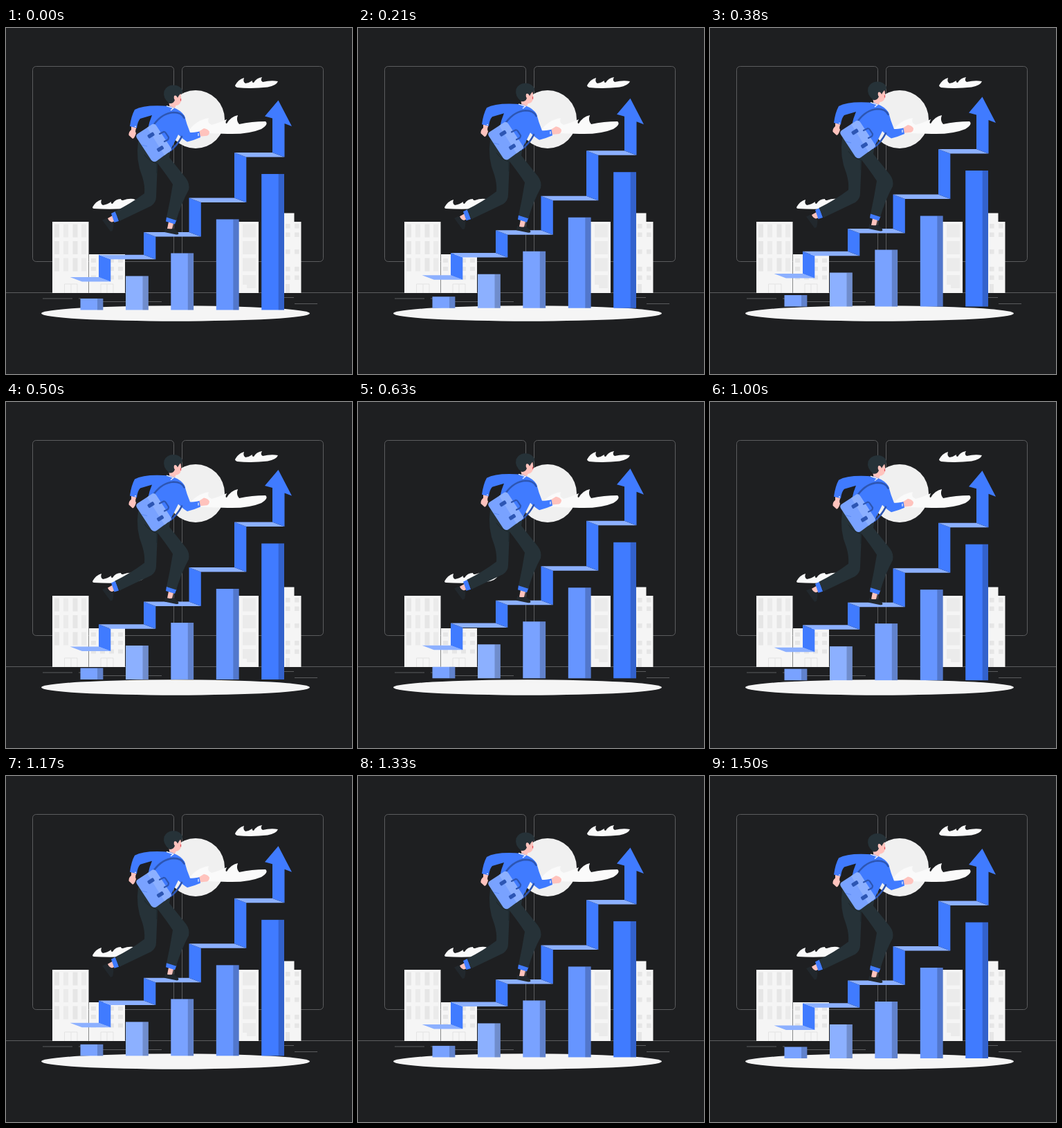
Write an HTML page that moves like this. It is 500x500 px and loops after 1540 ms.

```html
<!DOCTYPE html>
<html>
<head>
<meta charset="utf-8">
<style>
html, body { margin: 0; height: 100%; overflow: hidden; background: #1e1f21; }
svg { display: block; width: 100vw; height: 100vh; }
.line { fill: none; stroke: #5b5c5e; }
.wall { fill: #f5f5f5; }
.cloud { fill: #fafafa; }
.blue { fill: #407bff; }
.pale { fill: #8cb0ff; }
.dark { fill: #263238; }
.shoe { fill: #22282d; }
.skin { fill: #ffc3bd; }
.navy { fill: #2d56b3; }
.strap { fill: none; stroke: #2d56b3; stroke-width: 2.6; stroke-linecap: round; }
</style>
</head>
<body>
<svg viewBox="0 0 500 500">
  <g class="line">
    <rect x="38.5" y="55.5" width="204" height="282" rx="5"/>
    <rect x="254.5" y="55.5" width="204" height="282" rx="5"/>
    <path d="M0 382.5H500M53 391H96M105 391H108M140 395.5H225M400 389.5H416M417 398.5H450"/>
  </g>
  <g class="wall">
    <path d="M67 280H119.5V383H67ZM120 327H172V383H120ZM336 280H365V383H336ZM402 267.5H416.5V280H426.5V383H402Z"/>
  </g>
  <g id="windows"></g>
  <path d="M84.500 383V370H103V383M94 370V383M137 383V370H155V383M146 370V383" fill="none" stroke="#e3e3e3"/>
  <circle cx="274" cy="132" r="42" fill="#f0f0f0"/>
  <g class="cloud">
    <path d="M262 151Q274 133 293 130Q290 137 297 140Q308 137 319 132Q316 138 319 138Q325 128 335 126Q332 134 337 139Q355 135 375 135Q380 139 369 146Q350 154 320 153Q290 152 262 151Z"/>
    <path d="M331 83Q336 74 344 72Q342 78 346 80Q352 79 356 76Q355 79 358 79Q362 72 370 71Q367 76 371 78Q383 75 393 77Q391 83 378 85.500Q355 88 334 86Q331 85 331 83Z"/>
    <path d="M125 259Q130 250 138 248Q136 254 140 256Q147 255 152 251Q151 254 154 254Q158 247 166 247Q166 249 169 249Q177 246 184 247Q193 251 202 251Q200 258 185 260Q155 263 127 261Q125 261 125 259Z"/>
  </g>
  <ellipse cx="245" cy="412.500" rx="194" ry="11.200" class="wall"/>

  <g id="mover">
    <g id="bars"></g>
    <g id="stairs"></g>
    <path class="blue" d="M385 180V130.500L374 127.500L393.500 104.500L413 142L402.500 138V186.500Z"/>

    <g id="runner">
      <path class="skin" d="M147 275L154 271L157 279L150 282Z"/>
      <path class="shoe" d="M139 277.500L146 274.500Q150 281 155 281Q156 286 154 293L151 294Z"/>
      <path class="blue" d="M152 268L158 265L163 279L156.500 281Z"/>
      <path class="skin" d="M235 280L242 282L240 291L233 290Z"/>
      <path class="shoe" d="M230 288.500Q235 292 242 289.500Q248 293 249.500 297Q249 299 246 298.500L229 295Z"/>
      <path class="blue" d="M232 273L246.500 277L244 283.500L231 279.500Z"/>
      <path class="dark" d="M191 164Q187 191 197 215Q201 228 200 239Q180 254 157.500 265L164 279L210 257Q217 252 217 244L219 196L205 165Z"/>
      <path class="dark" d="M196 165Q204 185 217 193Q232 212 241 226Q237 251 232 273.500L246 278Q254 252 264 234Q266 225 260 217L236 187L238 174Z"/>
      <path d="M200 183Q206 192 218 196V210" fill="none" stroke="#1c262b"/>

      <path class="skin" d="M181 142L188.500 144Q186 149 188 152Q186 159 183 160L177.500 155Q177 150 181 147Z"/>
      <path class="skin" d="M278 150L286 145Q292 146 294 150Q294 156 288 156L278 157Z"/>
      <path class="skin" d="M235 105L247 108L244 116L237 117Z"/>
      <path class="blue" d="M237 113Q200 110 186 118Q181 127 179 142L189 144.500Q190 135 194 131L211 126Q207 135 205 146L196 168L236 180L249 154Q256 161 262 164.500Q272 162 281 158L279.500 149.500Q271 151 266 151Q261 139 258 127Q253 119 242 115Z"/>
      <path d="M232 112.500L242 116L238 119M186 142.500H188M278 152V156" fill="none" stroke="#fff" stroke-width="1.200"/>
      <path class="skin" d="M240 96L252 94Q254 101 252.500 107Q250 113 243 112L238 106Z"/>
      <path class="dark" d="M236 109Q226 101 228.500 91Q232 83 241 82.500Q251 82 255 90Q255 96 252 95Q250 97 248 101Q246 96 243 98Q242 102 244 104Q242 110 236 109Z"/>
      <path d="M252.500 102V105.500" stroke="#e0525d" stroke-width="1.300"/>

      <path class="strap" d="M214 139Q226 123 242 122Q254 122 257.500 130"/>
      <path class="strap" d="M254 157Q248 169 238 177"/>
      <path d="M190 153L210 140Q214 137 217 141L238 173Q240 176 237 178L218 192Q214 195 210 191L189 159Q187 155 190 153Z" fill="#79a2ff"/>
      <path class="pale" d="M204 144L210 140Q214 137 217 141L238 173Q240 176 237 178L229 184Z"/>
      <path d="M196 169L204 171" stroke="#5c8bf5"/>
      <path d="M222 153L228 150Q230 150 231 152L235 158Q235 161 233 162L229 164" class="strap" style="stroke-width:2.200"/>
      <g class="navy">
        <rect x="-5" y="-2.800" width="10" height="5.600" rx="1.500" transform="translate(209.500 155) rotate(-32)"/>
        <rect x="-5" y="-2.800" width="10" height="5.600" rx="1.500" transform="translate(223 174.500) rotate(-32)"/>
      </g>
    </g>
  </g>
</svg>
<script>
const $ = id => document.getElementById(id);
const rect = (x, y, w, h, fill) =>
  `<rect x="${x}" y="${y}" width="${w}" height="${h}" fill="${fill}"/>`;
const poly = (cls, ...points) => `<polygon class="${cls}" points="${points.join(' ')}"/>`;

function grid(xs, ys, w, h, fill = '#e6e6e6') {
  return xs.map(x => ys.map(y => rect(x, y, w, h, fill)).join('')).join('');
}
const floors = [283.5, 308, 332.5];
$('windows').innerHTML =
  grid([70, 96.5], floors, 7, 19) +
  grid([83, 109], floors, 7, 19, '#ebebeb') +
  grid([123, 136, 149, 162], [333, 345, 357.5], 7, 6) +
  grid([342], floors, 19, 19, '#ebebeb') +
  rect(342, 357, 19, 14, '#ebebeb') + rect(348, 371, 13, 5, '#ebebeb') +
  grid([404, 417], [283, 295.5, 320, 345, 357.5], 6.5, 6.5) +
  rect(404, 370, 6, 13, '#e6e6e6');

const bars = [
  [107.5, 391, '#79a2ff'], [173, 358.5, '#8cb0ff'], [238.3, 325.5, '#79a2ff'],
  [303.8, 276.5, '#6695ff'], [369.2, 211, '#407bff']
];
$('bars').innerHTML = bars.map(([x, y, fill]) =>
  rect(x, y, 32.8, 407.5 - y, fill) + rect(x + 24.5, y, 8.3, 407.5 - y, '#0003')).join('');

// Each step: left edge and height of the tread's back edge
const steps = [[92.5, 360], [134, 327.7], [199, 295], [264.5, 245.5], [330, 180], [385, 180]];
const front = ([x, y]) => [x + 17.3, y + 6.5];
$('stairs').innerHTML = steps.slice(0, -1).map(([x, y], i) => {
  const [nextX, nextY] = steps[i + 1];
  const a = [x, y], b = [nextX, y], c = [nextX, nextY];
  return poly('pale', a, b, front(b), front(a)) + poly('blue', c, front(c), front(b), b);
}).join('');

const LOOP = 1540, LOWEST = 1476, TRAVEL = 10;
function draw(now) {
  const phase = ((now - LOWEST) % LOOP + LOOP) % LOOP / LOOP;
  const rise = 1 - Math.abs(1 - 2 * phase);
  $('mover').setAttribute('transform', `translate(0 ${0.8 - TRAVEL * rise})`);
}
const start = performance.now();
function tick() {
  draw(performance.now() - start);
  requestAnimationFrame(tick);
}
tick();
</script>
</body>
</html>
```
